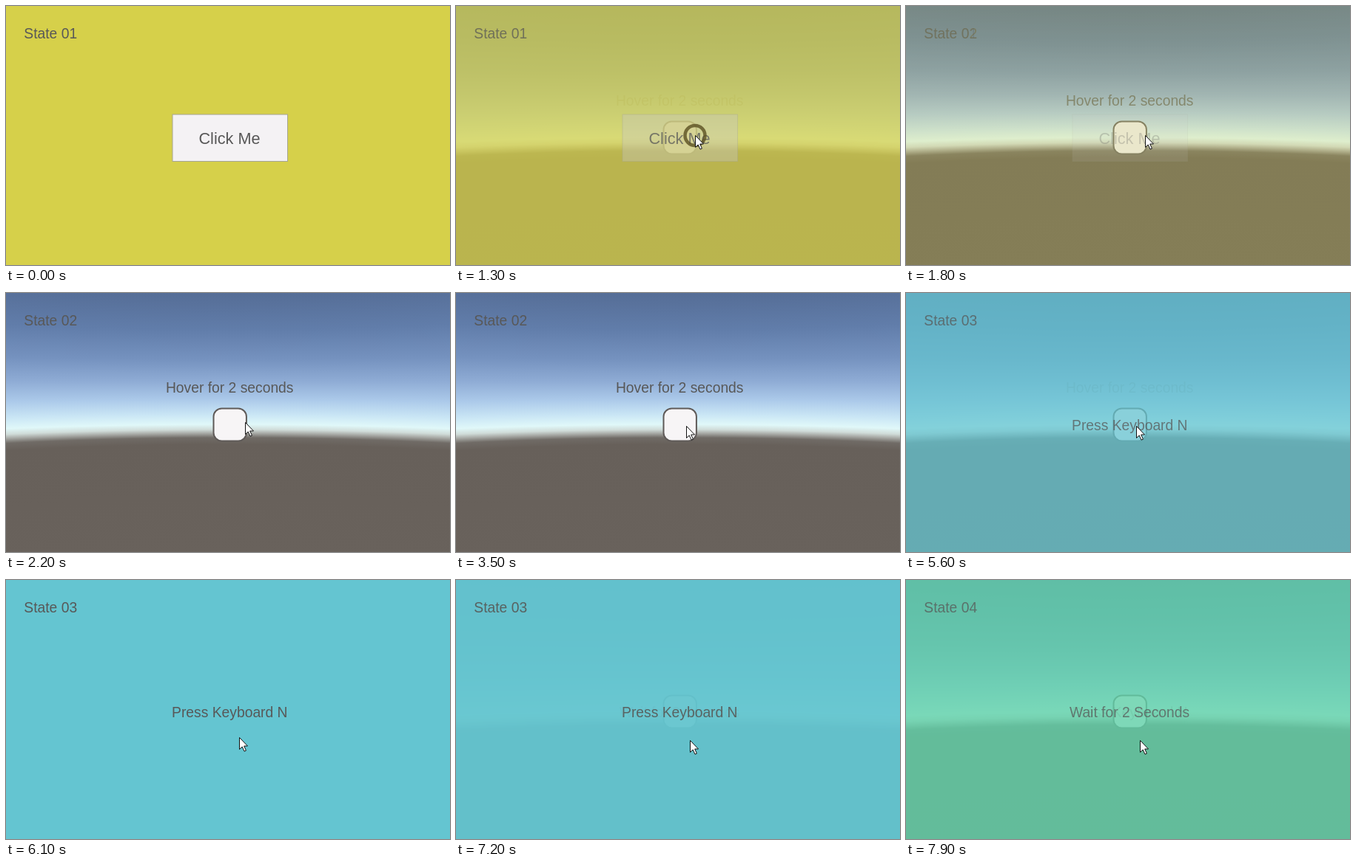
An HTML page with a canvas for the animation above (8 s loop, 600x351 px).

```html
<!DOCTYPE html>
<html>
<head>
<meta charset="utf-8">
<style>
html, body { margin: 0; width: 600px; height: 351px; overflow: hidden; }
canvas, svg { position: absolute; left: 0; top: 0; }
text { font: 19.3px "Liberation Sans", Arial, sans-serif; fill: #585858; }
.mid { text-anchor: middle; }
#panels > g > * { opacity: var(--a); }
</style>
</head>
<body>
<canvas id="sky" width="600" height="351"></canvas>
<svg width="600" height="351">
  <rect x="280.5" y="156.5" width="44.4" height="44" rx="11" fill="#f7f5f6" stroke="#5f5a58" stroke-width="2"/>
  <g id="panels">
    <g>
      <text x="24.3" y="43.5">State 02</text>
      <text class="mid" x="302.2" y="134.5">Hover for 2 seconds</text>
    </g>
    <g>
      <rect width="600" height="351" fill="#64c5d1"/>
      <text x="24.3" y="43.5">State 03</text>
      <text class="mid" x="302.3" y="186">Press Keyboard N</text>
    </g>
    <g>
      <rect width="600" height="351" fill="#62d2a6"/>
      <text x="24.3" y="43.5">State 04</text>
      <text class="mid" x="302" y="186">Wait for 2 Seconds</text>
    </g>
    <g>
      <rect width="600" height="351" fill="#d6d04a"/>
      <rect id="button" x="225" y="147" width="155.5" height="63.5" stroke="#a5a596"/>
      <text class="mid" x="302" y="187" style="font-size:21.7px">Click Me</text>
      <text x="24.3" y="43.5">State 01</text>
    </g>
  </g>
  <circle id="ring" cx="323" cy="175.5" fill="none" stroke="#5c5022" stroke-width="4.5"/>
  <path id="cursor" d="M.5 .5V16.5L4.2 13 7 19.2 9.4 18.1 6.7 12H11.5Z" fill="#fff" stroke="#111"/>
</svg>
<script>
const LOOP = 8000, STEP = 100;
const $ = id => document.getElementById(id);
const clamp = v => Math.min(1, Math.max(0, v));
const panels = [...$('panels').children];

// cursor stops: time, x, y
const path = [
  [400, 523, 290], [1000, 323, 175], [2300, 323, 175], [2600, 340, 210],
  [2900, 311, 180], [5700, 311, 180], [6200, 316, 217]
];

function drawSky() {
  const c = $('sky').getContext('2d');
  const g = c.createLinearGradient(0, 0, 0, 351);
  const stops = [
    [0, '#556d96'], [50, '#617daa'], [90, '#7592bf'], [120, '#8facd5'],
    [145, '#accaea'], [165, '#cae6f5'], [178, '#e0f8f9'], [185, '#d0dcd9'],
    [190, '#a8aaa6'], [196, '#706b66'], [205, '#67605a'], [351, '#69625c']
  ];
  for (const [y, color] of stops) g.addColorStop(y / 351, color);
  c.fillStyle = g;
  // towards both sides the horizon sinks and the upper sky gets lighter
  for (let x = 0; x < 600; x++) {
    const k = ((x - 300) / 300) ** 2;
    c.setTransform(1, 0, 0, 1 + 0.1 * k, 0, -12 * k);
    c.fillRect(x, 0, 1, 370);
  }
}

function cursorAt(t) {
  const i = path.findIndex(p => p[0] > t);
  if (i < 0) return path[path.length - 1].slice(1);
  const [t0, x0, y0] = path[i - 1], [t1, x1, y1] = path[i];
  const u = (t - t0) / (t1 - t0), e = u * u * (3 - 2 * u);
  return [x0 + (x1 - x0) * e, y0 + (y1 - y0) * e];
}

function draw(t) {
  const clicked = t >= 1300;
  const p1 = clicked ? clamp((t - 1050) / 1000) : 0;
  const p2 = clamp((t - 4850) / 1000);
  const p3 = clamp((t - 7150) / 1000);
  const alphas = [p1 * (1 - p2), p2 * (1 - p3), p3, 1 - p1];
  panels.forEach((p, i) => p.style.setProperty('--a', alphas[i]));

  $('button').setAttribute('fill', clicked ? '#c8c8c8' : '#f4f2f4');
  $('button').setAttribute('fill-opacity', clicked ? 0.5 : 1);
  $('button').setAttribute('stroke-opacity', clicked ? 0.5 : 1);

  const ring = t >= 1200 && t <= 1400;
  $('ring').setAttribute('r', ring ? 13.5 + (t - 1300) / 25 : 0);
  $('ring').setAttribute('opacity', ring ? 0.8 - Math.max(0, t - 1300) / 250 : 0);

  const shown = t >= path[0][0];
  $('cursor').setAttribute('visibility', shown ? 'visible' : 'hidden');
  if (shown) $('cursor').setAttribute('transform', `translate(${cursorAt(t).map(Math.round)})`);
}

function tick() {
  const t = performance.now() % LOOP;
  draw(Math.floor(t / STEP) * STEP);
  requestAnimationFrame(tick);
}

drawSky();
tick();
</script>
</body>
</html>
```
